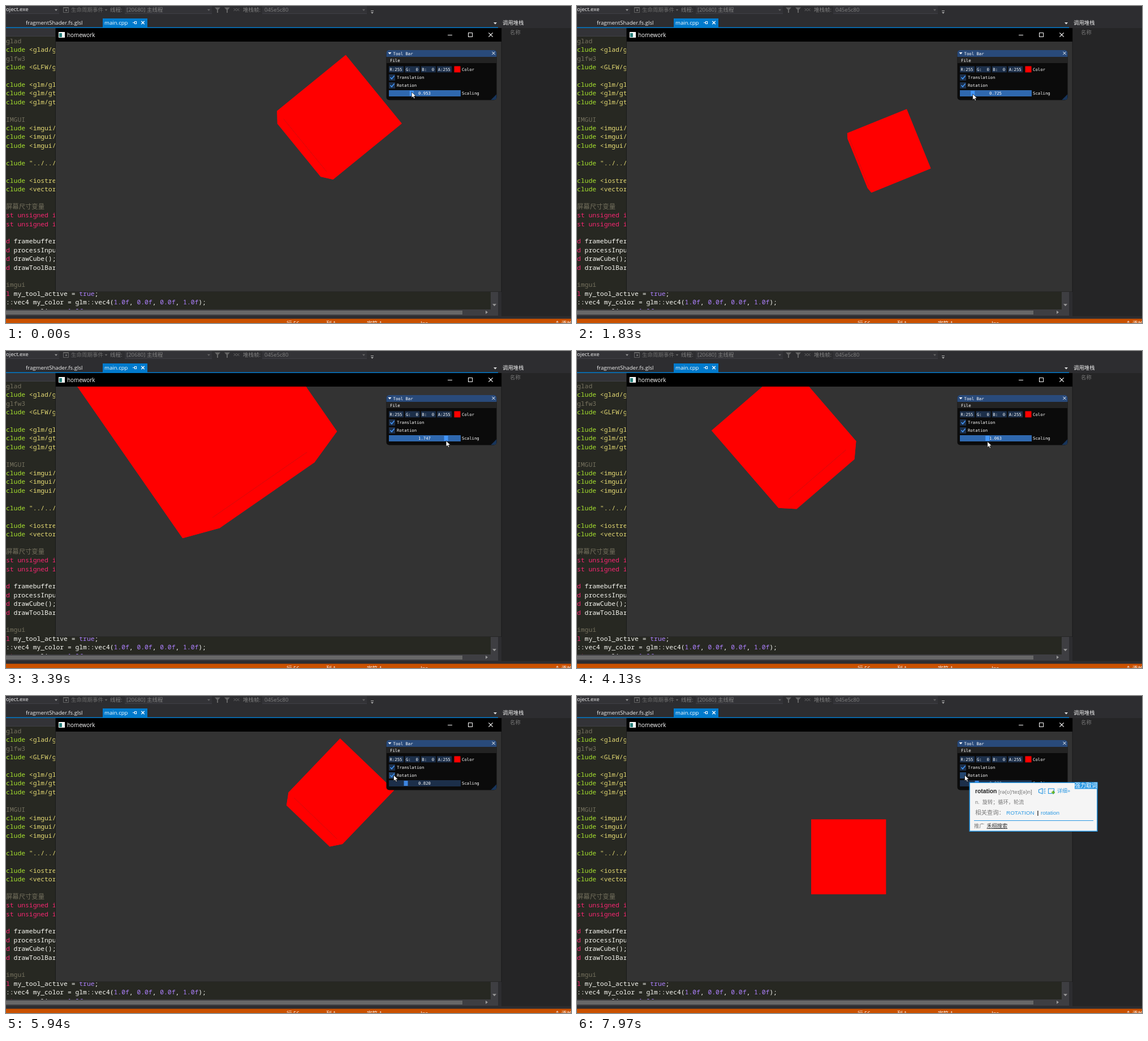
An HTML page with a canvas for the animation above (8000 ms loop, 999 px wide and 561 px high).

```html
<!DOCTYPE html>
<html lang="zh">
<head>
<meta charset="utf-8">
<title>homework</title>
<style>
html, body { margin: 0; width: 100%; height: 100%; overflow: hidden; background: #2d2d30; }
canvas { display: block; }
</style>
</head>
<body>
<canvas id="stage" width="999" height="561"></canvas>
<script>
const ctx = document.getElementById('stage').getContext('2d');
const CJK = '"Noto Sans CJK SC", "Noto Sans CJK"';
const UI = `"Open Sans", ${CJK}, sans-serif`;
const MONO = `"Noto Sans Mono", ${CJK}, monospace`;
const TOOL = '"DejaVu Sans Mono", monospace';
const POPUP = `"Liberation Sans", ${CJK}, sans-serif`;

const LOOP = 8;
const RELEASE = 4.66, FREEZE = 6.21, UNCHECK = 6.43, POPUP_AT = 7;

// One smooth step from a to b between two times.
function ease(t, t0, t1, a, b) {
  const p = Math.min(1, Math.max(0, (t - t0) / (t1 - t0)));
  return a + (b - a) * p * p * (3 - 2 * p);
}

function scaleAt(t) {
  if (t < 1.74) return ease(t, 0, 1.6, .953, .7);
  return t < 2.85 ? ease(t, 1.74, 2.85, .7, 2) : ease(t, 2.85, RELEASE, 2, .82);
}
const knobAt = scale => 682.5 + (scale - .5) / 1.5 * 115;
const swingAt = t => Math.sin((43.1 + 62.4 * t) * Math.PI / 180);

// The pointer drags the knob, then moves up and on to the checkbox.
function pointerAt(t) {
  if (t < RELEASE) return [knobAt(scaleAt(t)), 152 + 2 * t];
  if (t < 5.3) return [ease(t, RELEASE, 5.3, 707, 703.5), ease(t, RELEASE, 5.3, 161, 132)];
  return [ease(t, 5.3, 5.85, 703.5, 685.5), ease(t, 5.3, 5.85, 132, 140)];
}

function box(x, y, x2, y2, color) {
  ctx.fillStyle = color;
  ctx.fillRect(x, y, x2 - x, y2 - y);
}
function poly(points, color) {
  ctx.fillStyle = color;
  ctx.beginPath();
  points.forEach(p => ctx.lineTo(...p));
  ctx.closePath();
  ctx.fill();
}
function line(points, color, width = 1) {
  ctx.strokeStyle = color;
  ctx.lineWidth = width;
  ctx.beginPath();
  points.forEach(p => ctx.lineTo(...p));
  ctx.stroke();
}
function text(str, x, yMid, color, size = 9.6, family = UI, weight = '') {
  ctx.font = `${weight} ${size}px ${family}`;
  ctx.fillStyle = color;
  ctx.fillText(str, x, yMid + size * .36);
}
function arrowDown(x, y, color, r = 2.5) {
  poly([[x - r, y - r / 2], [x + r, y - r / 2], [x, y + r / 2 + .5]], color);
}
function cross(x, y, r, color, width) {
  line([[x - r, y - r], [x + r, y + r]], color, width);
  line([[x - r, y + r], [x + r, y - r]], color, width);
}

const INK = { g: '#a6e22e', y: '#e6db74', c: '#75715e', p: '#f92672', w: '#f8f8f2', n: '#ae81ff' };
// The first letter of each part picks its ink.
const CODE = `cglad
gclude |y<glad/g
cglfw3
gclude |y<GLFW/g

gclude |y<glm/gl
gclude |y<glm/gt
gclude |y<glm/gt

cIMGUI
gclude |y<imgui/
gclude |y<imgui/
gclude |y<imgui/

gclude |y"../../

gclude |y<iostre
gclude |y<vector

c屏幕尺寸变量
pst unsigned i
pst unsigned i

pd |wframebuffer
pd |wprocessInpu
pd |wdrawCube();
pd |wdrawToolBar

cimgui
pl |wmy_tool_active = |ntrue|w;
w::vec4 my_color = glm::vec4(|n1.0f|w, |n0.0f|w, |n0.0f|w, |n1.0f|w);
pat |wmy_scaling = |n1.0f|w;`.split('\n');

function drawCode() {
  box(0, 54, 870, 537, '#272822');
  CODE.forEach((row, i) => {
    let x = 0;
    for (const part of row ? row.split('|') : []) {
      text(part.slice(1), x, 61.9 + 15.41 * i, INK[part[0]], 11.35, MONO);
      x += ctx.measureText(part.slice(1)).width;
    }
  });
}

function drawEditor() {
  const dim = '#656565', muted = '#808080';
  box(0, 0, 999, 561, '#2d2d30');
  drawCode();

  // Debug toolbar
  for (const [x, x2] of [[0, 94], [210, 364], [453, 638]]) {
    box(x, 0, x2, 13, '#333337');
    line([[x, 13.5], [x2, 13.5]], '#3f3f46');
    arrowDown(x2 - 5.5, 7, x ? dim : '#999');
  }
  text('oject.exe', 0, 6, '#f1f1f1');
  box(101, 2, 111, 4, dim);
  line([[101.5, 3], [101.5, 11.5], [110.5, 11.5], [110.5, 3]], dim);
  box(105, 6, 108, 9, dim);
  text('生命周期事件', 115, 6.5, '#6d6d6d', 9.5);
  arrowDown(177, 7, dim);
  text('线程:', 184, 6.5, muted, 9.5);
  text('[20680] 主线程', 213, 6.5, muted, 9.5);
  for (const x of [374, 391]) {
    arrowDown(x, 5, dim, 5);
    box(x - 1, 6, x + 1, 12, dim);
  }
  cross(405, 6.5, 2.5, dim);
  cross(410, 6.5, 2.5, dim);
  text('堆栈帧:', 419, 6.5, muted, 9.5);
  text('045e5c80', 457, 6.5, muted, 9.5);
  box(645, 8, 650, 9, '#aaa');
  arrowDown(647.5, 12, '#aaa');

  // Tabs
  text('fragmentShader.fs.glsl', 35, 30, '#f1f1f1');
  box(171, 22, 250, 38, '#007acc');
  box(0, 37.5, 870, 39, '#007acc');
  text('main.cpp', 174, 30, '#fff');
  line([[224, 29.5], [227, 29.5]], '#fff');
  ctx.strokeRect(227.5, 27.5, 3, 4);
  cross(242, 29.5, 2.7, '#fff', 1.3);
  arrowDown(865, 30.5, '#ddd', 3);
  box(0, 39, 88, 54, '#333337');
  box(0, 53, 88, 54, '#3f3f46');

  // Scrollbars
  box(857, 500, 870, 537, '#3e3e42');
  arrowDown(863.5, 529, '#999', 3.5);
  box(0, 537, 870, 548, '#3e3e42');
  box(0, 539, 807, 546, '#686868');
  poly([[848, 539], [848, 545], [852, 542]], '#999');

  // Call stack panel and status bar
  text('调用堆栈', 878, 30, '#f1f1f1', 9.4);
  box(876, 39, 999, 549, '#252526');
  text('名称', 891, 46.5, '#777', 9.4);
  box(0, 553.5, 999, 561, '#ca5100');
  text('行 56', 496, 562, '#fff');
  text('列 1', 566, 562, '#fff');
  text('字符 1', 638, 562, '#fff');
  text('Ins', 733, 562, '#fff');
  text('↑ 添加', 970, 562, '#fff');
}

// The cube slides along its own turned axis; the turn equals the swing in radians.
function drawCube(t, scale) {
  const swing = swingAt(t), angle = t < UNCHECK ? swing : 0;
  const cos = Math.cos(angle), sin = Math.sin(angle), half = 71.5 * scale;
  const face = depth => [[-1, -1], [1, -1], [1, 1], [-1, 1]].map(([i, j]) => {
    const x = 176.5 * swing + i * half, y = j * half, zoom = 1 / (1 - .1366 * scale * depth);
    return [481.9 + (x * cos - y * sin) * zoom, 284.6 - (x * sin + y * cos) * zoom];
  });
  const front = face(1), back = face(-1);
  for (let i = 0; i < 4; i++) {
    const n = (i + 1) % 4;
    poly([front[i], front[n], back[n], back[i]], '#f00');
  }
  poly(front, '#f00');
}

function drawWindow(t) {
  box(87, 39, 876.5, 506, '#1a1a1a');
  box(88, 39, 876, 63, '#000');
  box(88, 63, 875.5, 505.5, '#333');
  box(93, 46, 104, 56, '#fff');
  box(94, 48, 99, 55, '#28817c');
  text('homework', 108, 51, '#fff', 9.9);
  line([[781, 51.5], [789, 51.5]], '#fff');
  ctx.strokeRect(817.5, 47.5, 7, 7);
  cross(857, 51, 3.7, '#fff', 1.1);
  ctx.save();
  ctx.beginPath();
  ctx.rect(88, 63, 787.5, 442.5);
  ctx.clip();
  drawCube(t, scaleAt(t - .02));
  ctx.restore();
}

const label = (s, x, y) => text(s, x, y, '#fff', 7.3, TOOL);
const tick = y => line([[679.5, y], [682, y + 2.7], [686.5, y - 2.8]], '#4296fa', 1.5);

function drawToolBar(t) {
  const scale = scaleAt(t), knob = knobAt(scale), active = t < RELEASE, frame = '#1c2f4a';
  ctx.save();
  ctx.beginPath();
  ctx.roundRect(672.5, 78, 195, 88.5, 5);
  ctx.clip();
  box(672, 78, 868, 167, '#0b0b0b');
  box(672, 78, 868, 90, '#294a7a');
  box(672, 90, 868, 101, '#232323');
  poly([[867.5, 156], [867.5, 166.5], [857, 166.5]], '#17345a');
  ctx.restore();
  arrowDown(678.5, 83.5, '#fff', 3);
  label('Tool Bar', 684.5, 84);
  cross(862, 83.5, 2.6, '#fff', 1);
  label('File', 679, 96);

  ['R:255', 'G:  0', 'B:  0', 'A:255'].forEach((s, i) => {
    const x = 677 + i * 28.4;
    box(x, 106.5, x + 26, 117.5, frame);
    label(s, x + 1.5, 112);
  });
  box(792.5, 106.5, 803.5, 117.5, '#f00');
  label('Color', 806, 112);

  box(677, 121, 688, 132, frame);
  tick(126.3);
  label('Translation', 691, 126.5);
  box(677, 135, 688, 146, t > 5.8 ? '#24466f' : frame);
  if (t < UNCHECK) tick(140.3);
  label('Rotation', 691, 140.5);

  box(677, 149, 804, 160, active ? '#2f68ae' : frame);
  box(knob - 3.5, 150, knob + 3.5, 159, active ? '#4296fa' : '#3d85e0');
  label(scale.toFixed(3), 729, 154.7);
  label('Scaling', 806, 154.7);
}

function drawPopup() {
  const blue = '#2a98e3', green = '#6ab820', gray = '#777';
  const put = (s, x, y, color, size = 9.9, weight = '') => text(s, x, y, color, size, POPUP, weight);
  box(693.5, 152.5, 920.5, 240, blue);
  box(695, 154, 919, 238.5, '#f5f5f5');
  box(880, 152.5, 920.5, 164.5, blue);
  put('强力取词', 880, 158.3, '#fff', 10);
  put('rotation', 704, 168.5, '#222', 10.3, 'bold');
  put("[rə(ʊ)'teɪʃ(ə)n]", 745, 169, gray);

  // Speaker and add-word icons
  line([[823, 163.5], [816.5, 166], [816.5, 170.5], [823, 173], [823, 163.5]], blue, 1.2);
  for (const dy of [-3, 0, 3]) line([[825, 168.3 + dy], [828.5, 168.3 + dy * 1.3]], blue, 1.1);
  ctx.strokeRect(833.5, 164, 10, 8.5);
  box(839, 169.5, 845, 171.5, green);
  box(841, 167.5, 843, 173.5, green);

  put('详细»', 849, 168, blue, 9);
  put('n.  旋转；循环，轮流', 704, 188, gray, 9.2);
  put('相关查询：', 704, 206.5, gray, 10.4);
  put('ROTATION', 759, 206.7, blue);
  put('|', 813.5, 206.5, '#222', 9.9, 'bold');
  put('rotation', 820, 206.7, blue);
  box(702, 220, 913, 221, blue);
  put('推广', 702, 229.5, gray, 9.2);
  put('禾栩搜索', 724.5, 229.5, '#333', 9.2);
  box(724.5, 234, 761, 235, '#333');
}

function drawPointer(x, y) {
  const shape = [[0, 0], [0, 10.5], [2.5, 8.3], [4.2, 12], [5.9, 11.2], [4.3, 7.6], [7.6, 7.4]]
    .map(([dx, dy]) => [x + dx, y + dy]);
  poly(shape, '#fff');
  line([...shape, shape[0]], '#000', .7);
}

function draw(seconds) {
  const clock = seconds % LOOP;
  const t = clock > FREEZE && clock < UNCHECK ? FREEZE : clock;
  drawEditor();
  drawWindow(t);
  drawToolBar(t);
  if (t >= POPUP_AT) drawPopup();
  drawPointer(...pointerAt(t));
}

const start = performance.now();
function animate() {
  draw((performance.now() - start) / 1000);
  requestAnimationFrame(animate);
}
animate();
</script>
</body>
</html>
```
